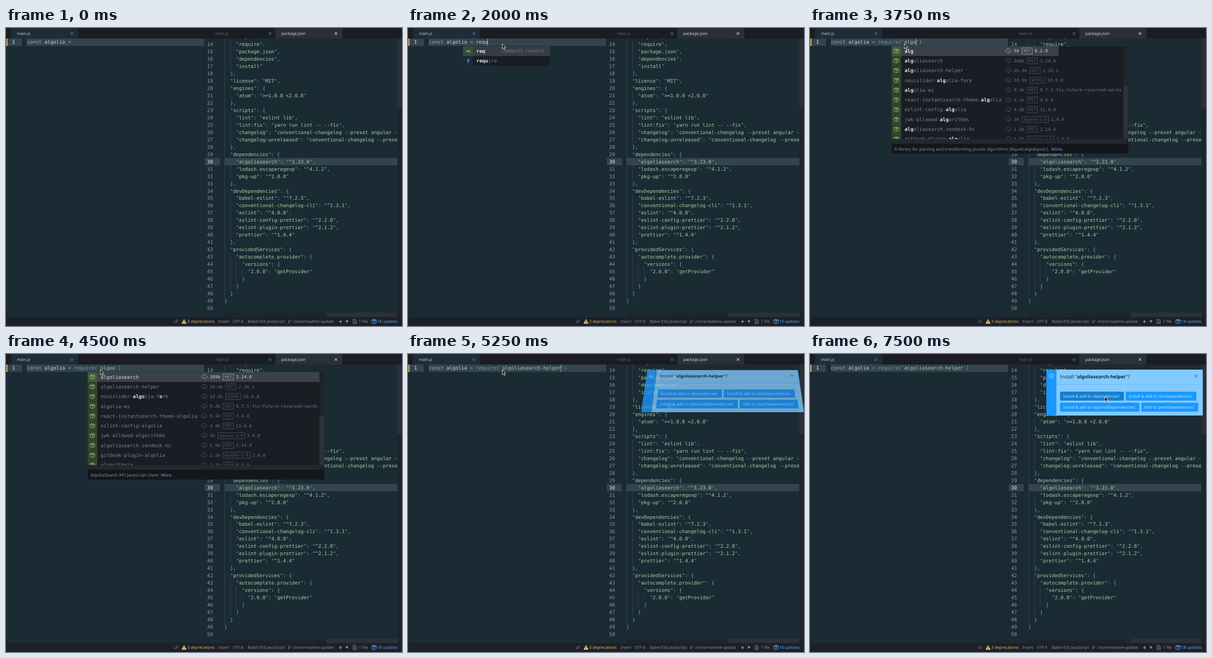
Animation of 863 by 649 pixels, one loop 8000 ms. Source, as an HTML page:

```html
<!DOCTYPE html>
<html lang="en">
<head>
<meta charset="utf-8">
<title>Editor autocomplete</title>
<style>
  html, body { margin: 0; width: 100%; height: 100%; overflow: hidden; background: #1b2b34; }
  svg { position: absolute; left: 0; top: 0; }
  text { white-space: pre; text-rendering: geometricPrecision; }
  .code { font: 10.63px "DejaVu Sans Mono", monospace; }
  .ui { font: 8.6px "Noto Sans", sans-serif; }
  #note { left: 515px; top: 34px; }
</style>
</head>
<body>
<svg id="base" width="863" height="649"></svg>
<svg id="live" width="863" height="649"></svg>
<svg id="note" width="341" height="100"></svg>
<svg id="pointer" width="863" height="649"></svg>
<script>
const LOOP = 8000, CHAR = 6.4, LINE = 15.96, ROW = 21.3;
const CODE_X = 45.6, JSON_X = 475.7;
const C = {
  bg: '#1b2b34', bar: '#1a1d23', line: '#34444e', teal: '#5fb3b3', green: '#a3d19e',
  white: '#cdd3de', purple: '#c594c5', blue: '#6699cc', grey: '#8b929d', dim: '#545a64',
  link: '#64a6ee', orange: '#e2b86b', name: '#7c838e', leaf: '#8bc070'
};

const JSON_LINES = `    "import",
    "require",
    "package.json",
    "dependencies",
    "install"
  ],
  "license": "MIT",
  "engines": {
    "atom": ">=1.0.0 <2.0.0"
  },
  "scripts": {
    "lint": "eslint lib",
    "lint:fix": "yarn run lint -- --fix",
    "changelog": "conventional-changelog --preset angular -
    "changelog:unreleased": "conventional-changelog --prese
  },
  "dependencies": {
    "algoliasearch": "^3.23.0",
    "lodash.escaperegexp": "^4.1.2",
    "pkg-up": "^2.0.0"
  },
  "devDependencies": {
    "babel-eslint": "^7.2.3",
    "conventional-changelog-cli": "^1.3.1",
    "eslint": "^4.0.0",
    "eslint-config-prettier": "^2.2.0",
    "eslint-plugin-prettier": "^2.1.2",
    "prettier": "^1.4.4"
  },
  "providedServices": {
    "autocomplete.provider": {
      "versions": {
        "2.0.0": "getProvider"
      }
    }
  }
}
`.split('\n');

const PACKAGES = `alg 56 MIT 0.2.0
algoliasearch 109k MIT 3.24.0
algoliasearch-helper 26.4k MIT 2.20.1
nouislider-algolia-fork 10.5k WTFPL 10.0.0
algolia-ms 9.2k MIT 0.7.1-fix-future-reserved-words
react-instantsearch-theme-algolia 6.1k MIT 4.0.4
eslint-config-algolia 4.8k MIT 11.0.0
jwk-allowed-algorithms 2k Apache-2.0 1.0.0
algoliasearch.zendesk-hc 1.6k MIT 2.14.4
gitbook-plugin-algolia 1.5k Apache-2.0 2.0.0
algorithmia 1.1k MIT 0.3.0`.split('\n').map(row => row.split(' '));

const ICON = {
  box: 'M0 2l5-2 5 2v6l-5 2-5-2zM0 2l5 2 5-2M5 4v6M2.5 1l5 2v2',
  cloud: 'M4 8H3a2.6 2.6 0 0 1 0-5.2a3.6 3.6 0 0 1 7 0A2.6 2.6 0 0 1 10 8H9M6.5 5v5M4.7 8.6l1.8 1.8 1.8-1.8',
  cross: 'M0 0l5.4 5.4M5.4 0L0 5.4',
  branch: 'M1 1v8M5.5 2v2q0 2-4.5 3',
  file: 'M0 0h4.5l2.5 2.5v6.5h-7zM2 4h3M3.5 2.5v3M2 7h3',
  down: 'M3 0v3.5M1 3.3l2 2.4 2-2.4z',
  up: 'M3 6v-3.5M1 2.7l2-2.4 2 2.4z',
  snippet: 'M0 3h6M3.8 .8l2.4 2.2-2.4 2.2M9 0v6'
};

const esc = s => s.replace(/&/g, '&amp;').replace(/</g, '&lt;');
const rect = (x, y, w, h, fill, more = '') =>
  `<rect x="${x}" y="${y}" width="${w}" height="${h}" fill="${fill}" ${more}/>`;
const label = (x, y, markup, fill, kind = 'ui', style = '') =>
  `<text x="${x}" y="${y}" fill="${fill}" class="${kind}" style="${style}">${markup}</text>`;
const span = (s, fill, weight = 400) =>
  `<tspan fill="${fill}" font-weight="${weight}">${esc(s)}</tspan>`;
const bold = s => `<tspan style="fill:#e3e6ec;font-weight:700">${esc(s)}</tspan>`;
const icon = (name, x, y, color, width = 1) =>
  `<path d="${ICON[name]}" transform="translate(${x} ${y})" fill="none" stroke="${color}" stroke-width="${width}"/>`;
const dot = (x, y, r, color) => `<circle cx="${x}" cy="${y}" r="${r}" fill="none" stroke="${color}"/>`;

// Strings are every second piece between quotes.
const highlight = s =>
  s.split('"').map((part, i) => i % 2 ? span(part, C.green) : esc(part)).join('"');

function jsonPane() {
  return rect(433, 283, 33, 16, C.line) + rect(477, 283, 376, 16, C.line) +
    JSON_LINES.map((src, i) => {
      const number = i + 13, y = 39.3 + (number - 14) * LINE;
      const indent = src.search(/\S|$/);
      let out = label(438.3, y, number, number === 30 ? '#e6eaee' : '#8a99a2', 'code');
      for (let c = 0; c < indent; c += 2)
        out += rect(Math.round(JSON_X + c * CHAR), y - 12, 1, LINE, '#31434c');
      return out + label(JSON_X + indent * CHAR, y, highlight(src.trim()), C.teal, 'code');
    }).join('');
}

function tabs() {
  return rect(0, 0, 863, 23, C.bar) +
    rect(11, 0, 146, 23, '#1e2d38') + label(24, 15, 'main.js', '#c8cdd6') + dot(143.5, 12.3, 2.3, '#4f8fd0') +
    label(456, 15, 'main.js', '#626974') + dot(575.5, 12.3, 2.3, '#4f8fd0') +
    rect(587, 0, 146, 23, '#2a2f38') + label(600, 15, 'package.json', '#d5d9e0') +
    icon('cross', 716.3, 9.3, '#d5d9e0', 1.1);
}

function statusBar() {
  const items = [[366, 'LF'], [463, 'Insert'], [494, 'UTF-8'], [527, 'Babel ES6 JavaScript'],
    [626, 'chore/readme-update'], [769, '1 file']];
  return rect(0, 629.5, 863, 20, '#1d2027') +
    items.map(([x, s]) => label(x, 642, s, C.grey)).join('') +
    label(395, 642, '3 deprecations', C.orange) + label(809, 642, '18 updates', C.link) +
    `<path d="M388 634.5l5 9h-10z" fill="${C.orange}" stroke="${C.orange}" stroke-linejoin="round"/>` +
    rect(387.5, 637.3, 1, 3.2, '#1d2027') + rect(387.5, 641.4, 1, 1.1, '#1d2027') +
    icon('branch', 615, 634, C.grey) + icon('down', 726, 636, C.grey, 1.5) +
    icon('up', 740, 636, C.grey, 1.5) + icon('file', 756.5, 634.5, C.grey) +
    icon('box', 797, 634, C.link);
}

function basePane() {
  return rect(0, 0, 863, 649, C.bg) +
    rect(2, 23, 33, 16, C.line) + rect(45, 23, 387, 16, C.line) + rect(1, 23, 2, 16, '#fac863') +
    label(13.3, 34, '1', '#e6eaee', 'code') + jsonPane() +
    rect(432, 23, 1, 607, '#182229') + rect(0, 23, 1, 607, C.bar) +
    rect(853, 23, 10, 607, '#1c252d') + rect(853, 23, 9, 152, '#2a303a') +
    rect(477, 620, 376, 10, '#1a252d') + rect(698, 620, 155, 10, '#2a313b') +
    tabs() + statusBar();
}

function codeLine({ word, pkg, caret }) {
  const quoted = pkg ? span("('", C.teal) + span(pkg, C.green) + span("')", C.teal) : '';
  const column = 16 + word.length + (pkg ? 2 + pkg.length : 0);
  return label(CODE_X, 34, span('const', C.purple) + ' algolia ' + span('=', C.teal) + ' ' +
      span(word, word === 'require' ? C.blue : C.white) + quoted, C.white, 'code') +
    (caret ? rect(Math.round(CODE_X + column * CHAR - .3), 23, 1, 16, '#c0c5ce') : '');
}

// Small menu: rows of [word, hint]; a hint marks a snippet.
function wordMenu({ x, width, rows }, prefix) {
  return rows.map(([word, hint], i) => {
    const y = 40 + i * 21.2, shared = [...word].findIndex((ch, k) => ch !== prefix[k]);
    const cut = shared < 0 ? word.length : shared;
    return rect(x, y, width, 21.2, i ? C.bar : '#373d45') +
      rect(x, y, 21.5, 21.2, hint ? '#3c4b38' : i ? '#1c2d3b' : '#2c4152') +
      (hint ? icon('snippet', x + 6, y + 7.5, C.leaf, 1.5)
            : label(x + 8, y + 14.5, 'f', C.link, 'code', 'font-weight:700')) +
      label(x + 29, y + 14, bold(word.slice(0, cut)) + esc(word.slice(cut)), C.name, 'code') +
      (hint ? label(x + width - 105, y + 13.2, hint, '#747b85', 'code', 'font-size:9.57px') : '');
  }).join('');
}

function mark(name, parts) {
  let pos = 0, out = '';
  for (const part of parts) {
    const at = name.indexOf(part, pos);
    if (at < 0) return name;
    out += name.slice(pos, at) + bold(part);
    pos = at + part.length;
  }
  return out + name.slice(pos);
}

function packageRow([name, downloads, license, version], i, list) {
  const y = 39.6 + i * ROW, on = i === list.selected;
  const info = on ? '#a3abb5' : C.dim;
  const small = 'font-size:9.57px;font-weight:700';
  const boxX = 450 + downloads.length * 5.76, boxW = license.length * 5.1 + 7.5;
  return (on ? rect(199, y, list.rowEnd - 199, ROW, '#39424a') : '') +
    rect(178, y, 21, ROW, on ? '#45573f' : '#33432f') +
    icon('box', 183.3, y + 5.3, C.leaf) +
    label(206.2, y + 14, mark(name, list.match), on ? '#d7dae0' : C.name, 'code') +
    icon('cloud', 425.7, y + 5, info) +
    label(444.3, y + 13.6, downloads, info, 'code', small) +
    rect(boxX, y + 4, boxW, 13, 'none', `stroke="${info}" stroke-width=".9"`) +
    label(boxX + 3.8, y + 13.3, license, info, 'code', 'font-size:8.45px') +
    label(boxX + boxW + 5.3, y + 13.6, version, info, 'code', small);
}

function packageMenu(list) {
  const rows = PACKAGES.slice(list.first, list.first + 10);
  return rect(178, 40, 516, 233, C.bar) +
    rows.map((row, i) => packageRow(row, i, list)).join('') +
    rect(178, 242, 516, 10, '#23272f') + rect(683, 40, 11, 212, '#1f232a') +
    rect(683, list.thumb, 10, 242 - list.thumb, '#2d323b') +
    rect(178, 252, 516, 21.5, '#14161b') +
    label(184, 266.6, esc(list.about) + '  ' + span('More..', C.link), '#848b96', 'ui', 'font-size:9.4px');
}

function notification(hover) {
  const buttons = [[30, 48, 139, "Install &amp; add to 'dependencies'"], [173, 48, 154, "Install &amp; add to 'devDependencies'"],
    [30, 72, 173, "Install &amp; add to 'optionalDependencies'"], [207, 72, 124, "Add to 'peerDependencies'"]];
  return rect(0, 0, 341, 100, '#82caff', 'rx="2"') + rect(0, 0, 22, 100, '#1a98ff', 'rx="2"') +
    rect(22, 32, 319, 1, '#6db9f2') +
    dot(11, 14, 4.6, '#d5ecff') + rect(10.5, 13.3, 1, 3.4, '#d5ecff') + rect(10.5, 11.2, 1, 1.2, '#d5ecff') +
    label(30, 19, 'Install "' + span('algoliasearch-helper', '#12283a', 700) + '"?', '#17324a', 'ui', 'font-size:10.4px') +
    icon('cross', 323.3, 11.5, '#3f76a0', 1.3) +
    buttons.map(([x, y, w, s], i) => rect(x, y, w, 19.5, hover && !i ? '#147fcc' : '#1a98ff', 'rx="1.5"') +
      label(x + 7, y + 12.6, s, '#c5e5ff')).join('');
}

const pointer = ([x, y]) =>
  `<path transform="translate(${x} ${y})" d="M.5 .5v10.5l2.5-2.3 1.9 4.2 1.9-.8-1.9-4.1h3.4z" fill="#111" stroke="#fff" stroke-width=".9"/>`;

const common = 'CommonJS require';
const puzzle = {
  first: 0, selected: 0, rowEnd: 542, match: ['alg'], thumb: 126,
  about: 'A library for parsing and transforming puzzle algorithms (&quot;algs&quot;).'
};
const search = {
  first: 1, selected: 0, rowEnd: 683, match: ['algo', 'o'], thumb: 135,
  about: 'AlgoliaSearch API JavaScript client'
};
const helper = { ...search, selected: 1, about: 'Helper for implementing advanced search features with algolia' };

// Each step changes part of the scene from its time on.
const STEPS = [
  [0, { word: '', pkg: '', caret: false, mouse: null, menu: null, list: null, note: null, hover: false }],
  [250, { mouse: [210, 38] }],
  [500, { mouse: [205, 34], caret: true }],
  [1000, { caret: false }],
  [1250, { caret: true }],
  [1750, { word: 're', menu: { x: 120, width: 183, rows: [['req', common], ['return']] } }],
  [2000, { word: 'requ', menu: { x: 120, width: 189, rows: [['req', common], ['require']] } }],
  [2250, { word: 'requi', menu: { x: 120, width: 150, rows: [['require']] } }],
  [2500, { word: 'requir', menu: { x: 143, width: 150, rows: [['require']] } }],
  [2750, { word: 'require', menu: null }],
  [3250, { pkg: 'a' }],
  [3500, { pkg: 'alg', list: { ...puzzle, match: ['al'] } }],
  [3750, { pkg: 'algo', list: puzzle }],
  [4000, { pkg: 'algoo', list: search }],
  [4500, { caret: false }],
  [4750, { caret: true, list: helper }],
  [5250, { pkg: 'algoliasearch-helper', list: null, note: 'opening' }],
  [5500, { note: 'open' }],
  [5750, { caret: false }],
  [6250, { caret: true }],
  [6500, { caret: false, mouse: [413, 82] }],
  [6750, { mouse: [754, 45] }],
  [7000, { caret: true, mouse: [766, 78] }],
  [7250, { mouse: [641.5, 92.5], hover: true }],
  [7500, { caret: false }]
];

const $ = id => document.getElementById(id);
$('base').innerHTML = basePane();

function render(scene) {
  const opening = scene.note === 'opening';
  $('live').innerHTML = codeLine(scene) +
    (scene.menu ? wordMenu(scene.menu, scene.word) : '') +
    (scene.list ? packageMenu(scene.list) : '');
  $('note').innerHTML = scene.note ? notification(scene.hover) : '';
  $('note').style.opacity = opening ? .78 : 1;
  $('note').style.transform = opening ? 'perspective(495px) translateY(-5px) rotateX(23deg)' : 'none';
  $('pointer').innerHTML = scene.mouse ? pointer(scene.mouse) : '';
}

let shown = 0;
function tick() {
  const time = performance.now() % LOOP;
  const passed = STEPS.filter(([start]) => start <= time);
  if (passed.length !== shown) {
    shown = passed.length;
    render(Object.assign({}, ...passed.map(([, change]) => change)));
  }
  requestAnimationFrame(tick);
}
tick();
</script>
</body>
</html>
```
